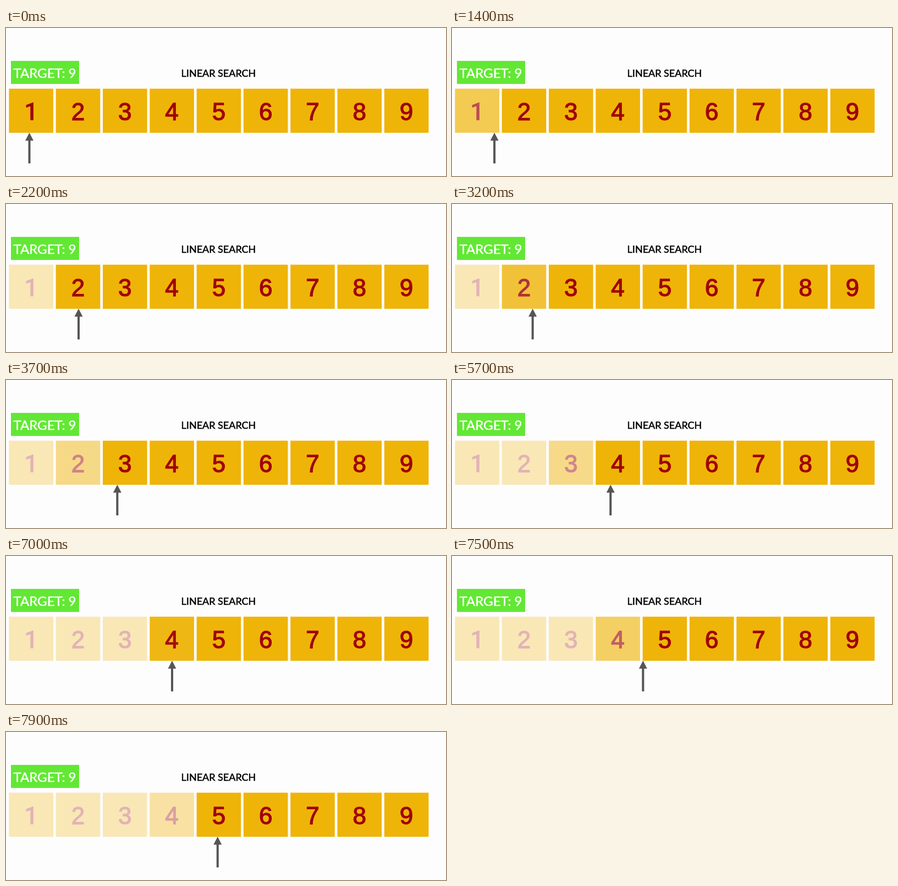
These frames come from a looping animation (800 px wide and 270 px high, 8 s). An HTML page:

```html
<!DOCTYPE html>
<html lang="en">
<head>
<meta charset="utf-8">
<title>Linear search</title>
<style>
  html, body { margin: 0; width: 100%; height: 100%; overflow: hidden; background: #fefdfe; }
  svg { display: block; width: 100%; height: 100%; }
  text { text-anchor: middle; }
  .caption { font-family: Lato, sans-serif; }
  .tile rect { fill: #efb408; }
  .tile text { font: 44px "Liberation Sans", Arial, sans-serif; fill: #a00008; stroke: #a00008; stroke-width: 1.3; }
  /* a numeral one without a foot */
  .tile:first-child text { font-family: Roboto, sans-serif; font-weight: 500; stroke-width: .4; }
</style>
</head>
<body>
<svg viewBox="0 0 800 270">
  <rect x="9" y="60" width="124" height="42" fill="#62e834"/>
  <text class="caption" x="70.5" y="91" font-size="24" fill="#fff" stroke="#fff" stroke-width=".5">TARGET: 9</text>
  <text class="caption" x="386.5" y="89" font-size="18" stroke="#000" stroke-width=".5">LINEAR SEARCH</text>
  <g id="tiles"></g>
  <path id="arrow" d="M0 191 L7.5 205.500 H2 V247 H-2 V205.500 H-7.5 Z" fill="#555"/>
</svg>
<script>
  const LOOP = 8000, TICK = 100, MOVE = 1100, DIM = 0.287;
  const starts = [930, 2900, 4880, 6925];
  const stops = [42.5, 132, 217, 301, 387.5];

  const tileGroup = document.getElementById('tiles');
  const arrow = document.getElementById('arrow');

  tileGroup.innerHTML = Array.from({ length: 9 }, (_, i) => {
    const x = 5.4 + 85.3 * i;
    return `<g class="tile"><rect x="${x}" y="110.7" width="80.6" height="80.5"/>` +
           `<text x="${x + 40.3}" y="168">${i + 1}</text></g>`;
  }).join('');
  const tiles = tileGroup.children;

  const clamp = v => Math.min(1, Math.max(0, v));
  const ease = u => (1 - Math.cos(Math.PI * u)) / 2;

  function draw(time) {
    // the picture advances ten times a second
    const t = Math.floor((time % LOOP) / TICK + 0.01) * TICK;
    let x = stops[0];
    starts.forEach((start, i) => {
      const u = clamp((t - start) / MOVE);
      x += (stops[i + 1] - stops[i]) * ease(u);
      tiles[i].setAttribute('opacity', 1 - (1 - DIM) * u);
    });
    arrow.setAttribute('transform', `translate(${x} 0)`);
  }

  const origin = performance.now();
  function frame() {
    draw(performance.now() - origin);
    requestAnimationFrame(frame);
  }
  frame();
</script>
</body>
</html>
```
